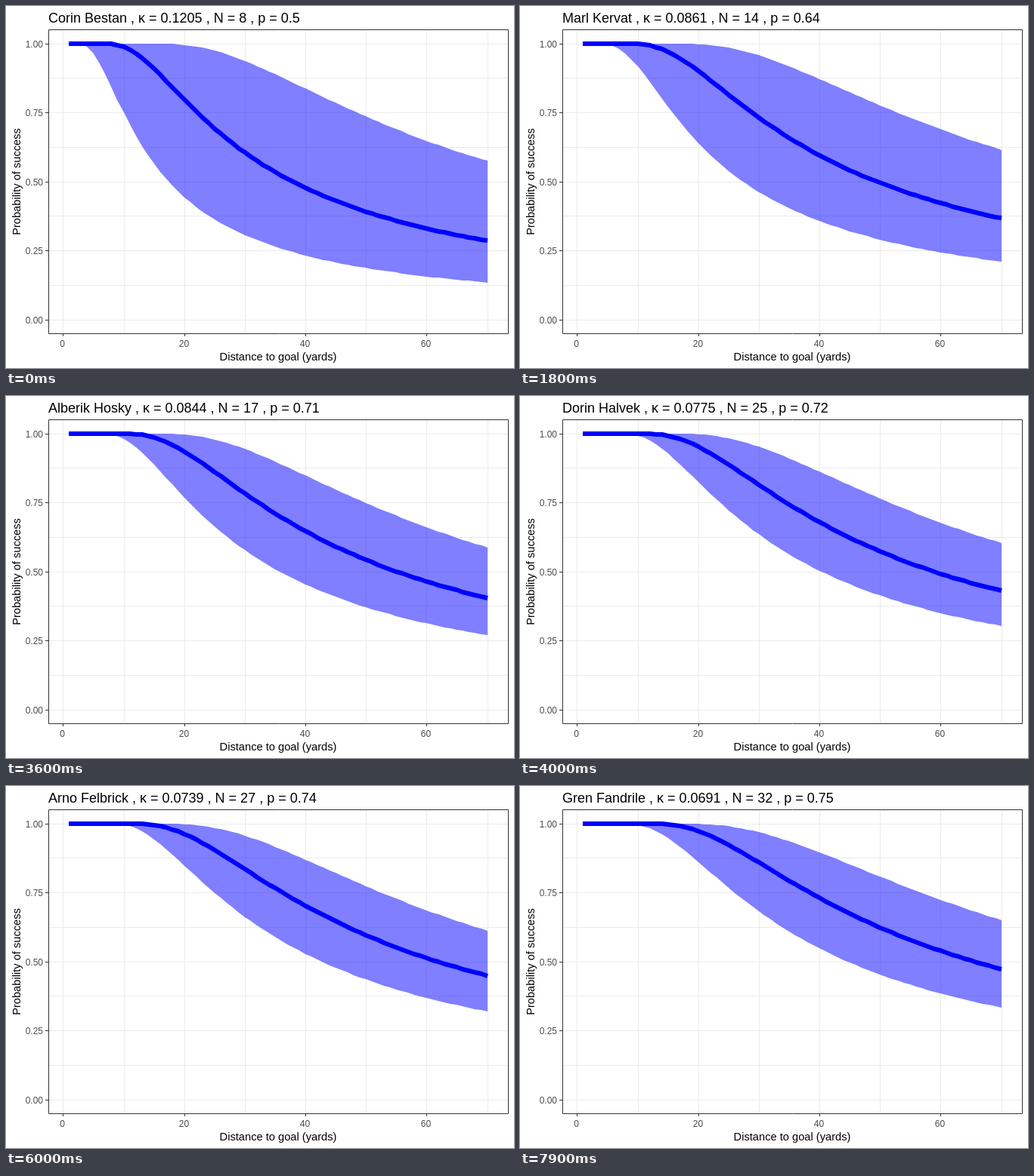
Write an HTML page with a canvas that moves like this. It is 672x480 px and loops after 8 s.

```html
<!DOCTYPE html>
<html lang="en">
<head>
<meta charset="utf-8">
<title>Kick accuracy</title>
<style>
  html, body { margin: 0; width: 100%; height: 100%; overflow: hidden; background: #fff; }
  canvas { display: block; }
</style>
</head>
<body>
<canvas id="chart" width="672" height="480"></canvas>
<script>
const ctx = document.getElementById('chart').getContext('2d');
const LOOP = 8000, STATE = 1000, TICK = 100;
const HALF_GOAL = 18.5 / 6; // yards
const MAX_YARDS = 70;
const panel = { left: 56, top: 31, right: 664, bottom: 434 };

// name, kappa, attempts, success rate, lower and upper kappa
const kickers = [
  ['Corin Bestan', 0.1205, 8, 0.5, 0.0552, 0.2605],
  ['Mica Hadent', 0.1029, 7, 0.71, 0.0497, 0.2065],
  ['Marl Kervat', 0.0861, 14, 0.64, 0.0513, 0.146],
  ['Alberik Hosky', 0.0844, 17, 0.71, 0.0542, 0.1318],
  ['Dorin Halvek', 0.0775, 25, 0.72, 0.0519, 0.1132],
  ['Delian Nolkren', 0.0755, 26, 0.73, 0.05145, 0.1108],
  ['Arno Felbrick', 0.0739, 27, 0.74, 0.051, 0.107],
  ['Zy Laub', 0.072, 9, 0.78, 0.0392, 0.1303],
  ['Gren Fandrile', 0.0691, 32, 0.75, 0.0493, 0.0968]
].map(([name, kappa, n, p, low, high]) => ({
  title: `${name} , κ = ${kappa} , N = ${n} , p = ${p}`,
  mid: curve(kappa), top: curve(low), base: curve(high)
}));

function erf(x) {
  const t = 1 / (1 + 0.3275911 * x);
  const poly = ((((1.061405429 * t - 1.453152027) * t + 1.421413741) * t - 0.284496736) * t + 0.254829592) * t;
  return 1 - poly * Math.exp(-x * x);
}

// Chance that a normal angle error stays between the posts
function curve(kappa) {
  return Array.from({ length: MAX_YARDS }, (_, i) =>
    erf(Math.atan(HALF_GOAL / (i + 1)) / kappa / Math.SQRT2));
}

// Every point snaps to whole pixels
const X = yards => Math.floor(75.83 + 8.017 * yards);
const Y = prob => Math.floor(416.3 - 366.2 * prob);
const mix = (a, b, f) => a.map((v, i) => v + (b[i] - v) * f);

function rect(color, x, y, w, h) {
  ctx.fillStyle = color;
  ctx.fillRect(x, y, w, h);
}

function text(str, x, y, size, color = '#000', align = 'left') {
  ctx.font = `${size}px "Liberation Sans", Arial, sans-serif`;
  ctx.fontKerning = 'none';
  ctx.textAlign = align;
  ctx.fillStyle = color;
  ctx.fillText(str, x, y);
}

function drawGrid() {
  const { left, top, right, bottom } = panel;
  for (let d = 0; d <= MAX_YARDS; d += 10) rect('#ebebeb', X(d), top, 1, bottom - top);
  for (let k = 0; k <= 8; k++) rect('#ebebeb', left, Y(k / 8), right - left, 1);
}

function drawAxes() {
  const { left, top, right, bottom } = panel;
  ctx.strokeStyle = '#333';
  ctx.lineWidth = 1;
  ctx.strokeRect(left + 0.5, top + 0.5, right - left, bottom - top);
  for (let d = 0; d <= 60; d += 20) {
    rect('#333', X(d), bottom + 1, 1, 3);
    text(String(d), X(d) - 0.5, 452, 12, '#4d4d4d', 'center');
  }
  for (let k = 0; k <= 4; k++) {
    const y = Y(k / 4);
    rect('#333', left - 4, y, 4, 1);
    text((k / 4).toFixed(2), 49, y + 5, 12, '#4d4d4d', 'right');
  }
  text('Distance to goal (yards)', 360, 470, 14.67, '#000', 'center');
  ctx.save();
  ctx.translate(19, 233);
  ctx.rotate(-Math.PI / 2);
  text('Probability of success', 0, 0, 14.67, '#000', 'center');
  ctx.restore();
}

function trace(probs, from = 0, step = 1) {
  for (let n = 0, i = from; n < probs.length; n++, i += step) ctx.lineTo(X(i + 1), Y(probs[i]));
}

function drawCurves(a, b, f) {
  ctx.beginPath();
  trace(mix(a.top, b.top, f));
  trace(mix(a.base, b.base, f), MAX_YARDS - 1, -1);
  ctx.closePath();
  ctx.fillStyle = 'rgba(0, 0, 255, 0.5)';
  ctx.fill();

  ctx.beginPath();
  trace(mix(a.mid, b.mid, f));
  ctx.strokeStyle = '#00f';
  ctx.lineWidth = 6;
  ctx.lineJoin = 'round';
  ctx.stroke();
}

function draw(ms) {
  const t = ms % LOOP;
  const index = Math.floor(t / STATE);
  const tick = Math.floor((t % STATE) / TICK);
  const f = Math.max(0, (tick - 5) / 5);
  const a = kickers[index], b = kickers[index + 1];

  rect('#fff', 0, 0, 672, 480);
  drawGrid();
  drawCurves(a, b, f);
  drawAxes();
  text((f < 0.5 ? a : b).title, 56, 22, 18);
}

const start = performance.now();
function loop() {
  draw(performance.now() - start);
  requestAnimationFrame(loop);
}
loop();
</script>
</body>
</html>
```
